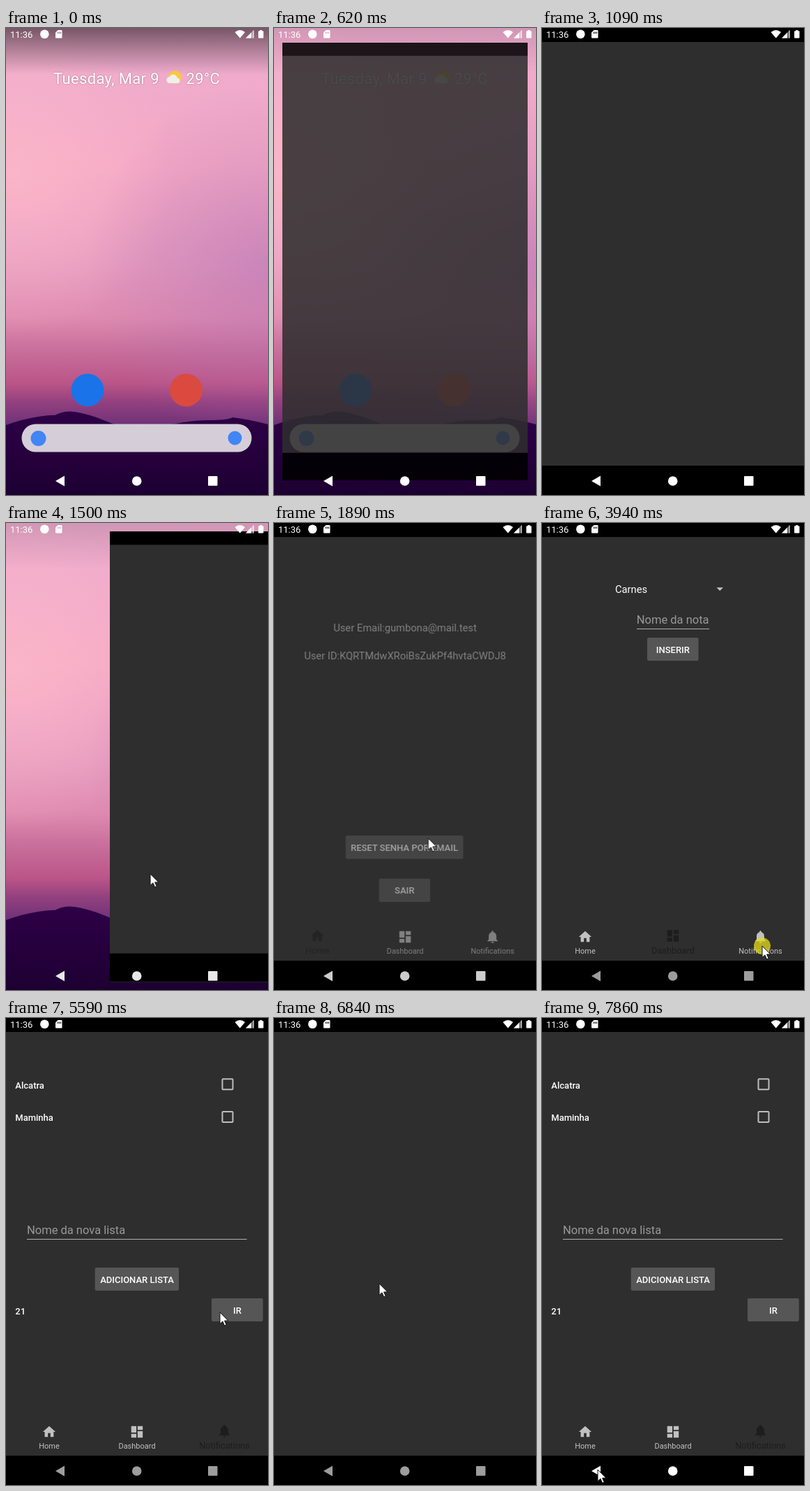
These frames come from a looping animation (376x668 px, 8000 ms). An HTML page without scripts:

```html
<!DOCTYPE html>
<html lang="pt">
<head>
<meta charset="utf-8">
<title>Phone demo</title>
<style>
@property --s { syntax: "<number>"; inherits: true; initial-value: 0; }

html, body { margin: 0; width: 100%; height: 100%; overflow: hidden; background: #000; }
svg { display: block; width: 376px; height: 668px; }
text { font-family: Roboto, "Noto Sans", sans-serif; }

.anim { animation: 8s linear infinite; }
.mid { text-anchor: middle; }
.date { font-size: 22px; letter-spacing: .35px; fill: #fff; text-shadow: 0 0 2px #0006; }
.info { font-size: 14.7px; fill: #c3c3c3; }
.hint { font-size: 16.5px; fill: #999; }
.strong { font-size: 13px; font-weight: 500; fill: #fff; }
.btn { fill: #565656; }
.line { fill: #b0b0b0; }
.box { fill: none; stroke: #bdbdbd; stroke-width: 2; }

/* launcher */
.shade { animation-name: shade; }
@keyframes shade { 0%, 6.74% { opacity: 1; } 7.75%, 100% { opacity: .25; } }
.launcher { animation-name: launcher; }
@keyframes launcher { 0%, 13% { visibility: visible; } 13.01%, 100% { visibility: hidden; } }

/* windows */
.splash, .app { transform-origin: 188px 334px; }
.splash { animation-name: splash; }
@keyframes splash {
  0%, 6.74% { opacity: 0; transform: scale(.9); }
  6.75% { opacity: .45; transform: scale(.9); }
  7.75% { opacity: .87; transform: scale(.937); }
  9.2% { opacity: 1; transform: scale(.972); }
  13.6%, 16.6% { opacity: 1; transform: none; }
  18.5% { opacity: 1; transform: translateX(-395px) scale(.955); }
  18.51%, 100% { opacity: 0; transform: translateX(-395px) scale(.955); }
}
.app { animation-name: app; }
@keyframes app {
  0%, 17.2% { transform: translateX(395px) scale(.955); }
  18.75% { transform: translateX(144.2px) scale(.964); animation-timing-function: cubic-bezier(.1, .6, .2, 1); }
  24%, 100% { transform: none; }
}
.content { animation-name: content; }
@keyframes content { 0%, 22.5% { opacity: 0; } 24.5%, 100% { opacity: 1; } }
.sub { animation-name: sub; }
@keyframes sub {
  0%, 70.8% { visibility: hidden; transform: translateY(13px); clip-path: inset(96% 0 0 0); }
  70.81% { visibility: visible; transform: translateY(13px); clip-path: inset(96% 0 0 0); animation-timing-function: cubic-bezier(.2, .3, .1, 1); }
  76.5%, 91.4% { visibility: visible; transform: none; clip-path: inset(0); animation-timing-function: cubic-bezier(.2, .3, .1, 1); }
  96.9% { visibility: visible; transform: translateY(13px); clip-path: inset(96% 0 0 0); }
  96.91%, 100% { visibility: hidden; transform: translateY(13px); clip-path: inset(96% 0 0 0); }
}

/* tabs: --s is 1 while a tab is selected */
.t1 { animation-name: tab1; }
.t2 { animation-name: tab2; }
.t3 { animation-name: tab3; }
@keyframes tab1 { 0%, 40.5% { --s: 1; } 42.5%, 100% { --s: 0; } }
@keyframes tab2 { 0%, 40.5% { --s: 0; } 42.5%, 51.1% { --s: 1; } 53%, 100% { --s: 0; } }
@keyframes tab3 { 0%, 51.1% { --s: 0; } 53%, 100% { --s: 1; } }
.page { opacity: var(--s); }
.tab { fill: rgb(calc(192 - 163 * var(--s)), calc(192 - 163 * var(--s)), calc(192 - 163 * var(--s))); }
.tab path { transform: translateY(calc(-1.4px * var(--s))) scale(.914); }
.tab text { font-size: 11px; text-anchor: middle; transform: translate(11px, 35px) scale(calc(1 + .165 * var(--s))); }

/* system buttons */
.keys { animation-name: keys; }
@keyframes keys {
  0%, 16.6% { fill: #fff; }
  18.75% { fill: #e8e8e8; }
  26.6%, 38.4% { fill: #bdbdbd; }
  47.2%, 88.6% { fill: #9d9d9d; }
  89.6%, 100% { fill: #fff; }
}
.ripple { animation-name: ripple; }
@keyframes ripple { 0%, 88.6% { opacity: 0; } 89.6% { opacity: .2; } 93.5%, 100% { opacity: 0; } }

/* pointer */
.pointer { animation-name: pointer; }
@keyframes pointer {
  0%, 16.59% { visibility: hidden; transform: translate(222px, 514px); }
  16.6% { visibility: visible; transform: translate(222px, 514px); }
  18.75% { transform: translate(207px, 502px); }
  26.6% { transform: translate(230px, 420px); }
  28.5% { transform: translate(285px, 134px); }
  30% { transform: translate(352px, 190px); }
  32.5% { transform: translate(92px, 196px); }
  34% { transform: translate(118px, 420px); }
  35.37%, 36% { transform: translate(157px, 528px); }
  38.6%, 42% { transform: translate(187px, 604px); }
  47.2%, 51.1% { transform: translate(316px, 605px); }
  61%, 62% { transform: translate(171px, 371px); }
  66.9%, 69.86% { transform: translate(295px, 423px); }
  69.87%, 72.5% { transform: translate(307px, 421px); }
  79.6% { transform: translate(300px, 330px); }
  83% { transform: translate(215px, 140px); }
  88.3%, 100% { visibility: visible; transform: translate(80px, 646px); }
}
.click { animation-name: click; animation-timing-function: step-end; }
@keyframes click {
  0% { opacity: 0; }
  39.6% { opacity: .75; }
  41% { opacity: 0; }
  49.25% { opacity: .75; }
  51.12% { opacity: 0; }
  70.8% { opacity: .75; }
  72.3% { opacity: 0; }
  88.6% { opacity: .75; }
  90.4% { opacity: 0; }
}
</style>
</head>
<body>
<svg viewBox="0 0 376 668" xmlns="http://www.w3.org/2000/svg">
  <defs>
    <linearGradient id="sky" x2="0" y2="1">
      <stop offset="0" stop-color="#eeaccf"/>
      <stop offset=".3" stop-color="#f4a9c5"/>
      <stop offset=".5" stop-color="#e59bbf"/>
      <stop offset=".62" stop-color="#df8bb0"/>
      <stop offset=".69" stop-color="#c86f9b"/>
      <stop offset=".76" stop-color="#bb5588"/>
      <stop offset=".8" stop-color="#94417f"/>
      <stop offset=".85" stop-color="#6f3178"/>
    </linearGradient>
    <radialGradient id="glow" gradientUnits="userSpaceOnUse" cx="10" cy="210" r="230">
      <stop offset="0" stop-color="#fcb8ca" stop-opacity=".8"/>
      <stop offset="1" stop-color="#fcb8ca" stop-opacity="0"/>
    </radialGradient>
    <radialGradient id="dusk" gradientUnits="userSpaceOnUse" cx="376" cy="340" r="260">
      <stop offset="0" stop-color="#b070b4" stop-opacity=".5"/>
      <stop offset="1" stop-color="#b070b4" stop-opacity="0"/>
    </radialGradient>
    <linearGradient id="hill" x2="0" y2="1">
      <stop offset="0" stop-color="#2e0047"/>
      <stop offset="1" stop-color="#1d0032"/>
    </linearGradient>
    <linearGradient id="dim" x2="0" y2="1">
      <stop offset="0" stop-opacity=".5"/>
      <stop offset="1" stop-opacity="0"/>
    </linearGradient>
    <g id="frame">
      <rect width="376" height="668"/>
      <rect y="20" width="376" height="606" fill="#2e2e2e"/>
    </g>
  </defs>

  <!-- wallpaper -->
  <rect width="376" height="668" fill="url(#sky)"/>
  <rect width="376" height="668" fill="url(#glow)"/>
  <rect width="376" height="668" fill="url(#dusk)"/>
  <path fill="url(#hill)" d="M0 568Q25 559 46 556T70 554Q84 547 98 549T130 557L158 568 220 571Q262 561 290 561T325 557Q350 560 376 567V668H0Z"/>
  <rect class="anim shade" width="376" height="66" fill="url(#dim)"/>

  <g class="anim launcher">
    <text class="date" x="68" y="80">Tuesday, Mar 9</text>
    <text class="date" x="258.5" y="80">29°C</text>
    <circle cx="242.5" cy="70.5" r="9.5" fill="#f9c83c"/>
    <path fill="#f0efe9" d="M235 79a4.6 4.6 0 0 1 0-9.2 5.6 5.6 0 0 1 10.6 1.4 4 4 0 0 1 1 7.8z"/>
    <circle cx="117" cy="518" r="23.5" fill="#1a73e8"/>
    <circle cx="258.500" cy="518" r="23.500" fill="#db4a3f"/>
    <rect x="22.500" y="566.500" width="330" height="40" rx="20" fill="#d5ced9"/>
    <circle cx="46.500" cy="587" r="11" fill="#4285f4"/>
    <circle cx="328.500" cy="586.500" r="10" fill="#4285f4"/>
  </g>

  <use class="anim splash" href="#frame"/>

  <g class="anim app">
    <use href="#frame"/>
    <g class="anim content">
      <g class="anim t1"><g class="page">
        <text class="info mid" x="188" y="155">User Email:gumbona@mail.test</text>
        <text class="info mid" x="188" y="195.500">User ID:KQRTMdwXRoiBsZukPf4hvtaCWDJ8</text>
        <rect class="btn" x="102.500" y="447" width="169" height="33.500" rx="2"/>
        <text class="strong mid" x="187" y="468.700">RESET SENHA POR EMAIL</text>
        <rect class="btn" x="150.500" y="508.500" width="73.500" height="33.500" rx="2"/>
        <text class="strong mid" x="187.200" y="530">SAIR</text>
      </g></g>
      <g class="anim t2"><g class="page">
        <text class="info" x="105" y="100" style="fill:#fff">Carnes</text>
        <path fill="#c4c4c4" d="M250.500 92.300h9.500l-4.750 4.700z"/>
        <text class="hint mid" x="187.700" y="144">Nome da nota</text>
        <rect class="line" x="136" y="151" width="104" height="1"/>
        <rect class="btn" x="151" y="164" width="73.500" height="33" rx="2"/>
        <text class="strong mid" x="187.800" y="185.600">INSERIR</text>
      </g></g>
      <g class="anim t3"><g class="page">
        <text class="strong" x="13.300" y="100.700">Alcatra</text>
        <text class="strong" x="13.300" y="147.300">Maminha</text>
        <rect class="box" x="310.500" y="87.300" width="15" height="15" rx="1"/>
        <rect class="box" x="310.500" y="134" width="15" height="15" rx="1"/>
        <text class="hint" x="30" y="309">Nome da nova lista</text>
        <rect class="line" x="30" y="316" width="315.500" height="1"/>
        <rect class="btn" x="127.700" y="357" width="120.300" height="33" rx="2"/>
        <text class="strong mid" x="188" y="378.600">ADICIONAR LISTA</text>
        <text class="strong" x="13.300" y="424">21</text>
        <rect class="btn" x="295" y="401" width="73.700" height="33" rx="2"/>
        <text class="strong mid" x="332" y="422.700">IR</text>
      </g></g>

      <g class="anim t1"><g class="tab" transform="translate(51 581)">
        <path d="M10 20v-6h4v6h5v-8h3L12 3 2 12h3v8z"/>
        <text>Home</text>
      </g></g>
      <g class="anim t2"><g class="tab" transform="translate(177 581)">
        <path d="M3 13h8V3H3zm0 8h8v-6H3zm10 0h8V11h-8zm0-18v6h8V3z"/>
        <text>Dashboard</text>
      </g></g>
      <g class="anim t3"><g class="tab" transform="translate(302.500 581)">
        <path d="M12 22c1.100 0 2-.9 2-2h-4c0 1.100.9 2 2 2zm6-6v-5c0-3-1.600-5.600-4.500-6.300V4a1.500 1.500 0 0 0-3 0v.7C7.600 5.400 6 7.900 6 11v5l-2 2v1h16v-1z"/>
        <text>Notifications</text>
      </g></g>
    </g>
  </g>

  <rect class="anim sub" y="20" width="376" height="606" fill="#2e2e2e"/>

  <!-- status bar -->
  <g fill="#fff">
    <text x="6" y="13.700" font-size="13">11:36</text>
    <circle cx="55.300" cy="8.800" r="6.300"/>
    <path fill-rule="evenodd" d="M74.500 3H79.500q1 0 1 1V13.500q0 1-1 1H72q-1 0-1-1V6.500zM74 5.500v2.500h1V5.500zm2 0v2.500h1V5.500zm2 0v2.500h1V5.500z"/>
    <path d="M328.500 6Q335.800 0 343 6L335.800 14.500z"/>
    <path d="M355.500 3V14.500H344z" opacity=".4"/>
    <path d="M352 6.500V14.500H344zM355.500 3V14.500H354.500V4z"/>
    <path d="M364.300 3h3v1.200h1.500q.7 0 .7.700V13.800q0 .7-.7.700h-6q-.7 0-.7-.7V4.900q0-.7.700-.7h1.500z"/>
  </g>

  <!-- system buttons -->
  <rect class="anim ripple" x="39" y="628" width="77" height="40" rx="20" fill="#fff"/>
  <g class="anim keys">
    <path d="M71 648L84 640.500V655.500z"/>
    <circle cx="187.700" cy="648" r="6.800"/>
    <rect x="290" y="641" width="13.500" height="13.700" rx="1"/>
  </g>

  <g class="anim pointer">
    <circle class="anim click" r="12" fill="#e6dc1e" opacity="0"/>
    <path d="M0 0V16.500L3.900 12.900 6.600 19 9.200 17.900 6.600 12H11.800z" fill="#fff" stroke="#111" stroke-width="1" stroke-linejoin="round"/>
  </g>
</svg>
</body>
</html>
```
